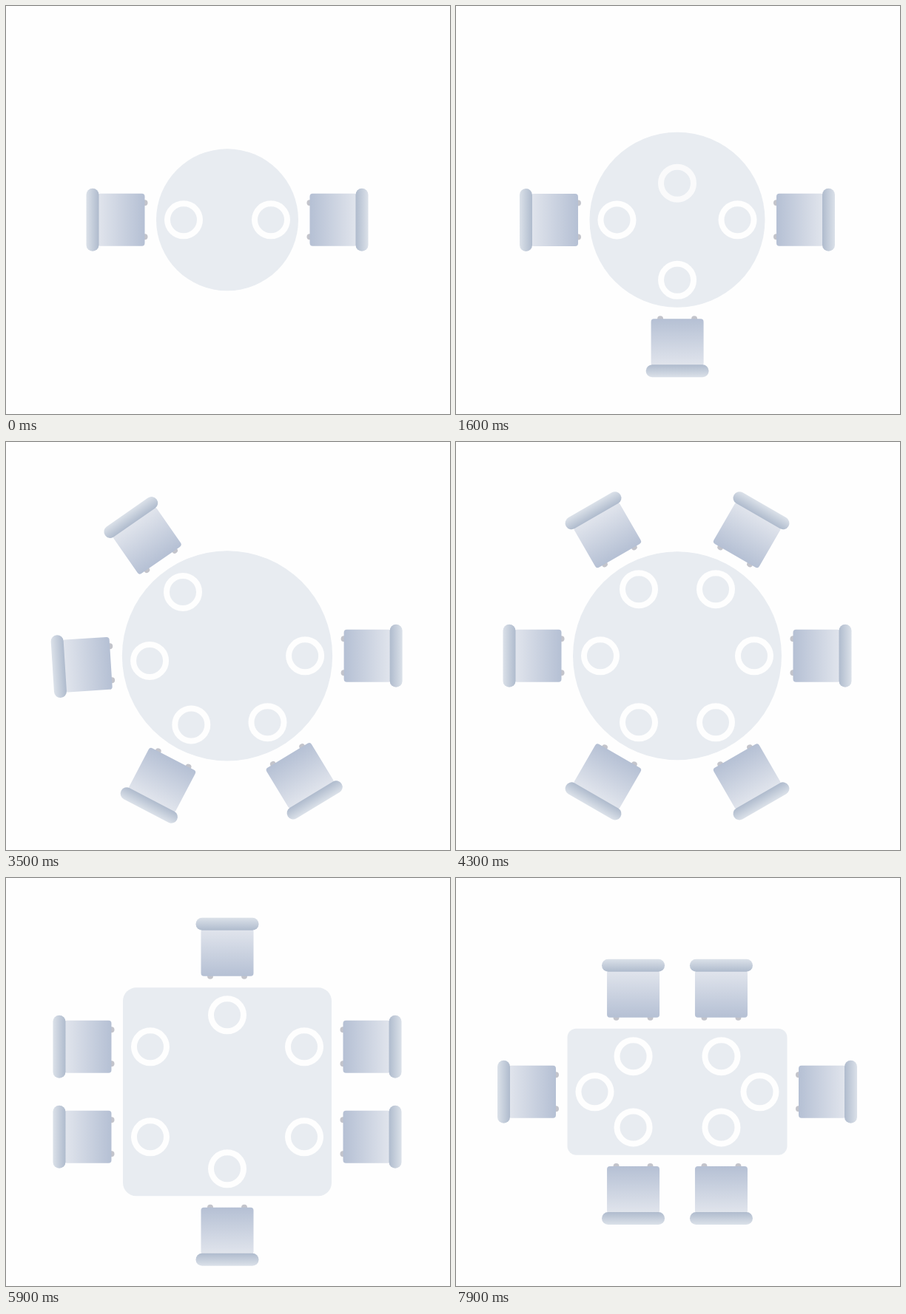
Recreate the animation shown at these times as an HTML page with a canvas. Size 600x552 px, loop 8 s.

```html
<!DOCTYPE html>
<html>
<head>
<meta charset="utf-8">
<style>
html, body { margin: 0; width: 100%; height: 100%; overflow: hidden; background: #fefefe; }
canvas { display: block; }
</style>
</head>
<body>
<canvas id="stage" width="600" height="552"></canvas>
<script>
const ctx = document.getElementById('stage').getContext('2d');
const LOOP = 8000, MOVE = 350, ENTER = 300, TABLE_LEAD = 5;
const RAD = Math.PI / 180;
const INSET = 37;    // table edge to plate centre
const REACH = 52.5;  // plate centre to front of seat

// A seat is [polar angle, distance, facing], in degrees and pixels.
function round(seats, start, plateAt, chairAt) {
  const r = 96 + 11.25 * (seats - 2);
  return {
    start, plateAt, chairAt, table: [r, r, r],
    seats: Array.from({ length: seats }, (_, i) => {
      const a = 360 * i / seats;
      return [a, r - INSET, a];
    })
  };
}

const stages = [
  round(2, -1000),
  round(3, 450, 715, 800),
  round(4, 1260, 1552, 1655),
  round(5, 2397, 2598, 2690),
  round(6, 3300, 3520, 3605),
  {
    start: 5387, table: [141, 141, 18],
    seats: [[-30.4, 120.6, 0], [149.6, 120.6, 180], [-90, 104, -90],
            [90, 104, 90], [30.4, 120.6, 0], [210.4, 120.6, 180]]
  },
  {
    start: 6582, table: [148.5, 85.5, 12],
    seats: [[-141, 76.5, -90], [39, 76.5, 90], [-39, 76.5, -90],
            [141, 76.5, 90], [0, 111.5, 0], [180, 111.5, 180]]
  }
];

const clamp = x => Math.max(0, Math.min(1, x));
const mix = (a, b, p) => a + (b - a) * p;

function outBack(x) {
  const u = clamp(x) - 1;
  return 1 + 2.70158 * u ** 3 + 1.70158 * u ** 2;
}

function place([angle, dist, facing]) {
  return {
    x: dist * Math.cos(angle * RAD),
    y: dist * Math.sin(angle * RAD),
    facing: facing * RAD
  };
}

// Along one side seats slide straight; otherwise they swing around the centre.
function between(a, b, p) {
  if (a[2] !== b[2]) return place(a.map((v, i) => mix(v, b[i], p)));
  const from = place(a), to = place(b);
  return { x: mix(from.x, to.x, p), y: mix(from.y, to.y, p), facing: to.facing };
}

function gradient(x0, c0, x1, c1) {
  const g = ctx.createLinearGradient(x0, 0, x1, 0);
  g.addColorStop(0, c0);
  g.addColorStop(1, c1);
  return g;
}
const seatFill = gradient(0, '#b5c0d4', 62, '#e0e4ec');
const backFill = gradient(62, '#afbbcd', 79, '#dbe1e9');

function box(x, y, w, h, r, fill) {
  ctx.fillStyle = fill;
  ctx.beginPath();
  ctx.roundRect(x, y, w, h, r);
  ctx.fill();
}

function drawPlate({ x, y }, alpha) {
  ctx.globalAlpha = alpha;
  ctx.strokeStyle = '#fefefe';
  ctx.lineWidth = 8;
  ctx.beginPath();
  ctx.arc(x, y, 22, 0, 7);
  ctx.stroke();
  ctx.globalAlpha = 1;
}

function drawChair({ x, y, facing }, away, alpha) {
  ctx.save();
  ctx.globalAlpha = alpha;
  ctx.translate(x, y);
  ctx.rotate(facing);
  ctx.translate(REACH + away, 0);
  for (const side of [-23, 23]) box(-4, side - 4, 8, 8, 4, '#c3c4cb');
  box(0, -35.5, 64, 71, 4, seatFill);
  box(62, -42.5, 17, 85, 8.5, backFill);
  ctx.restore();
}

function draw(t) {
  let k = stages.length - 1;
  while (k > 0 && t < stages[k].start) k--;
  const stage = stages[k], prev = stages[Math.max(0, k - 1)];
  const p = outBack((t - stage.start) / MOVE);
  const tableP = outBack((t - stage.start + TABLE_LEAD) / MOVE);

  ctx.fillStyle = '#fefefe';
  ctx.fillRect(0, 0, 600, 552);
  ctx.save();
  ctx.translate(299, 289.3);

  const [w, h, r] = stage.table.map((v, i) => mix(prev.table[i], v, tableP));
  box(-w, -h, 2 * w, 2 * h, Math.min(r, w, h), '#e8ecf1');

  stage.seats.forEach((seat, i) => {
    const old = prev.seats[i];
    if (old) {
      const pose = between(old, seat, p);
      drawChair(pose, 0, 1);
      drawPlate(pose, 1);
      return;
    }
    const plateX = clamp((t - stage.plateAt) / ENTER);
    const chairX = clamp((t - stage.chairAt) / ENTER);
    const plate = place([seat[0], seat[1] * outBack(plateX), seat[2]]);
    drawChair(place(seat), 100 * (1 - outBack(chairX)), clamp(chairX * 5));
    drawPlate(plate, clamp(plateX * 5));
  });
  ctx.restore();
}

const begin = performance.now();
function tick() {
  draw((performance.now() - begin) % LOOP);
  requestAnimationFrame(tick);
}
tick();
</script>
</body>
</html>
```
